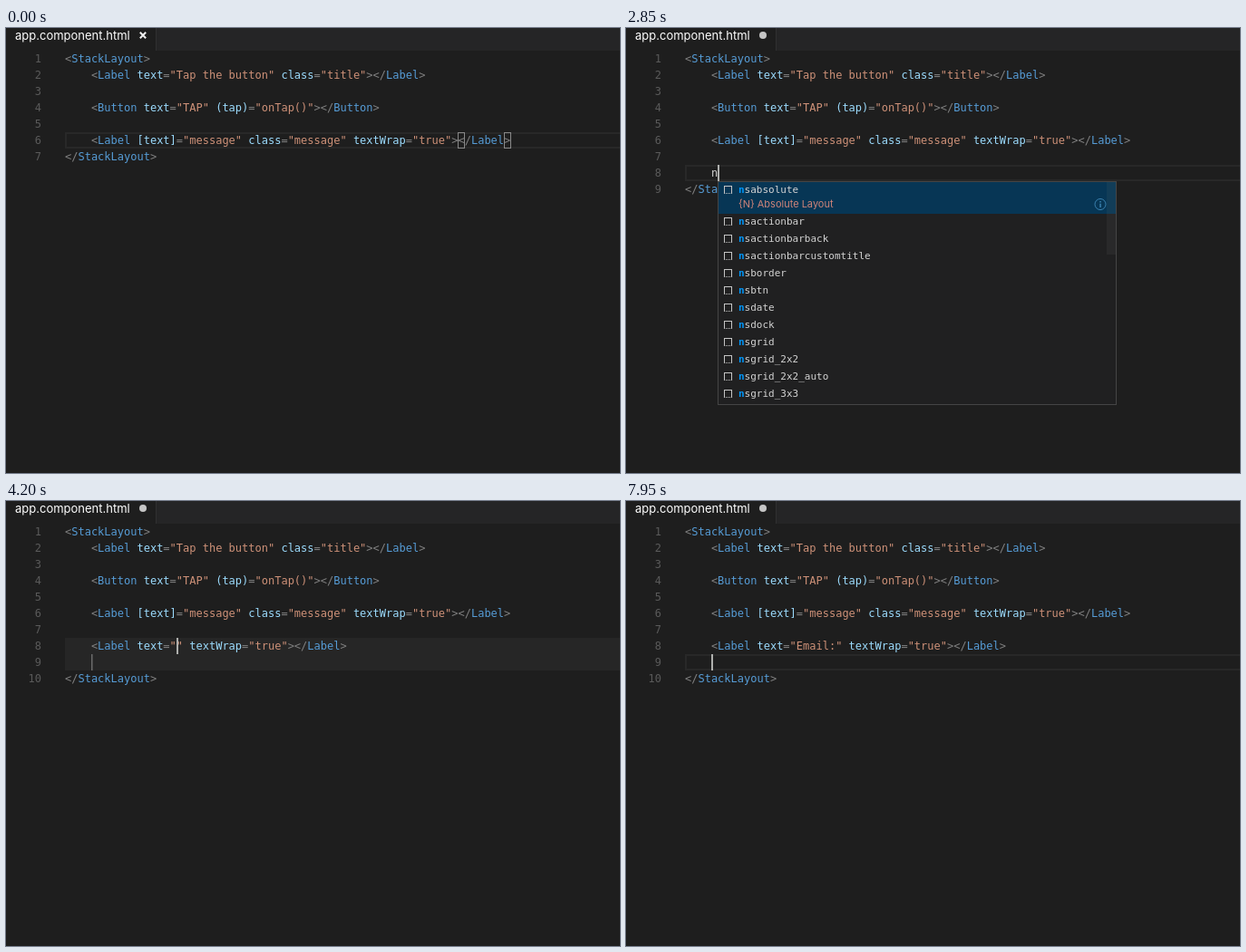
Animation, 677 px wide and 491 px high, one loop 8 s. Source, as an HTML page with a canvas:

```html
<!DOCTYPE html>
<html lang="en">
<head>
<meta charset="utf-8">
<title>Code editor</title>
<style>
  html, body { margin: 0; width: 100%; height: 100%; overflow: hidden; background: #1e1e1e; }
  canvas { display: block; }
</style>
</head>
<body>
<canvas width="677" height="491"></canvas>
<script>
const ctx = document.querySelector('canvas').getContext('2d');
const LOOP = 8000, LEFT = 65, TOP = 25, ROW = 18, INDENT = '    ';
const MONO = '"DejaVu Sans Mono", monospace', SANS = 'Inter, sans-serif';
ctx.font = `12px ${MONO}`;
const CHAR = ctx.measureText('x').width;

const HEAD = [
  '<StackLayout>',
  INDENT + '<Label text="Tap the button" class="title"></Label>',
  '',
  INDENT + '<Button text="TAP" (tap)="onTap()"></Button>',
  '',
  INDENT + '<Label [text]="message" class="message" textWrap="true"></Label>'
];
const TAIL = '</StackLayout>';
const SNIPPETS = ['absolute', 'actionbar', 'actionbarback', 'actionbarcustomtitle', 'border', 'btn',
  'date', 'dock', 'grid', 'grid_2x2', 'grid_2x2_auto', 'grid_3x3'].map(name => 'ns' + name);

const label = text => `${INDENT}<Label text="${text}" textWrap="true"></Label>`;
const typed = text => ({ body: ['', INDENT + text], col: 4 + text.length, on: true });
const filled = text => ({ body: ['', label(text), INDENT], col: 17 + text.length, on: true, value: text });
const popup = (col, match, items, detail, scroll = 0) => ({ list: { col, match, items, detail, scroll } });
const all = (col, match, scroll) => popup(col, match, SNIPPETS, '{N} Absolute Layout', scroll);
const single = col => popup(col, 4, ['nslabel'], '{N} Label');

// Each step changes part of the editor state at its time in ms.
const STEPS = [
  [0, { body: [], row: 6, col: 68, on: false, brackets: [60, 67] }],
  [300, { on: true }],
  [750, { on: false }],
  [1350, { on: true }],
  [1800, { on: false }],
  [2100, { body: [''], row: 7, col: 4, on: true, brackets: [], dirty: true }],
  [2400, { ...typed(''), row: 8 }],
  [2850, { ...typed('n'), ...all(5, 1, 0.1) }],
  [3000, all(5, 1, 0.4)],
  [3150, { ...typed('ns'), ...all(5, 2, 0.4) }],
  [3300, all(6, 2, 0.4)],
  [3600, { ...typed('nsla'), ...single(7) }],
  [3750, single(8)],
  [4200, { ...filled(''), list: null, snippet: true }],
  [4800, { on: false }],
  [5250, { on: true }],
  [5550, filled('E')],
  [5700, filled('Em')],
  [6000, filled('Emai')],
  [6150, filled('Email')],
  [6600, filled('Email:')],
  [7200, { col: 49, brackets: [41, 48] }],
  [7500, { row: 9, col: 4, brackets: [], snippet: false }]
];

const colX = col => LEFT + col * CHAR;
const rowY = row => TOP + (row - 1) * ROW;

function rect(x, y, w, h, color) {
  ctx.fillStyle = color;
  ctx.fillRect(x, y, w, h);
}

function frame(x, y, w, h, color, width = 1) {
  ctx.strokeStyle = color;
  ctx.lineWidth = width;
  ctx.strokeRect(x + width / 2, y + width / 2, w - width, h - width);
}

function text(str, x, y, color, font, align = 'left') {
  ctx.font = font;
  ctx.textAlign = align;
  ctx.fillStyle = color;
  ctx.fillText(str, x, y);
}

function drawTab(dirty) {
  rect(165, 0, 512, TOP, '#252526');
  rect(165, 0, 1, TOP, '#303031');
  text('app.component.html', 10, 13, '#fff', `13px ${SANS}`);
  ctx.beginPath();
  if (dirty) {
    ctx.arc(151, 8, 4, 0, 2 * Math.PI);
    ctx.fillStyle = '#c5c5c5';
    ctx.fill();
  } else {
    ctx.moveTo(147.8, 4.8);
    ctx.lineTo(154.2, 11.2);
    ctx.moveTo(154.2, 4.8);
    ctx.lineTo(147.8, 11.2);
    ctx.strokeStyle = '#f0f0f0';
    ctx.lineWidth = 2;
    ctx.stroke();
  }
}

function drawLine(line, row) {
  const y = rowY(row) + 13, font = `12px ${MONO}`;
  text(row, 39, y, '#5a5a5a', font, 'right');
  let previous = '';
  for (const { 0: token, index } of line.matchAll(/"[^"]*"|<\/?|>|=|[^\s"<>=]+/g)) {
    let color = '#9cdcfe';
    if (!line.includes('<')) color = '#d4d4d4';
    else if (token[0] === '"') color = '#ce9178';
    else if (/^[<>=]/.test(token)) color = '#808080';
    else if (previous[0] === '<') color = '#569cd6';
    text(token, colX(index), y, color, font);
    previous = token;
  }
}

function drawActiveRow({ row, snippet, value }) {
  if (snippet) {
    rect(LEFT, rowY(8), 612, 2 * ROW, '#262626');
    if (value) rect(188, rowY(9) - 1, colX(label(value).length) - 188, 1, '#333');
    rect(94, rowY(9), 1.5, ROW, '#6a6a6a');
  } else {
    frame(LEFT, rowY(row), 620, ROW, '#282828', 2);
  }
}

function drawIcon(x, y) {
  rect(x, y, 9, 1, '#c5c5c5');
  rect(x, y, 1, 8, '#c5c5c5');
  rect(x + 8, y, 1, 8, '#c5c5c5');
  for (let i = 0; i < 9; i += 2) rect(x + i, y + 8, 1, 1, '#c5c5c5');
}

function drawList({ col, match, items, detail, scroll }) {
  const x = Math.round(colX(col)), y = rowY(9);
  const height = 37 + 19 * (items.length - 1) + (items.length > 1 ? 1 : 0);
  rect(x, y, 440, height, '#202021');
  rect(x + 1, y + 1, 438, 35, '#073655');
  items.forEach((item, i) => {
    const center = i ? y + 25 + 19 * i : y + 9;
    const font = `11px ${MONO}`, split = x + 23;
    drawIcon(x + 7, center - 4);
    text(item.slice(0, match), split, center + 4, '#0097fb', `bold ${font}`);
    text(item.slice(match), split + ctx.measureText(item.slice(0, match)).width, center + 4, '#d4d4d4', font);
  });
  text(detail, x + 23, y + 29, '#ce8379', `11px ${SANS}`);
  ctx.beginPath();
  ctx.arc(x + 422, y + 25.5, 6, 0, 2 * Math.PI);
  ctx.strokeStyle = '#3b82b0';
  ctx.lineWidth = 1;
  ctx.stroke();
  rect(x + 421.3, y + 22, 1.5, 1.5, '#3b82b0');
  rect(x + 421.3, y + 24.7, 1.5, 4.3, '#3b82b0');
  rect(x + 429, y + 1, 10, 80, `rgba(121,121,121,${scroll})`);
  frame(x, y, 440, height, '#454545');
}

function draw() {
  const now = performance.now() % LOOP;
  const state = Object.assign({}, ...STEPS.filter(([time]) => time <= now).map(step => step[1]));
  rect(0, 0, 677, 491, '#1e1e1e');
  drawTab(state.dirty);
  drawActiveRow(state);
  [...HEAD, ...state.body, TAIL].forEach((line, i) => drawLine(line, i + 1));
  for (const col of state.brackets) frame(Math.round(colX(col)), rowY(state.row), 8, ROW, '#888');
  if (state.on) rect(Math.round(colX(state.col)), rowY(state.row), 2, ROW, '#aeafad');
  if (state.list) drawList(state.list);
  requestAnimationFrame(draw);
}
draw();
</script>
</body>
</html>
```
